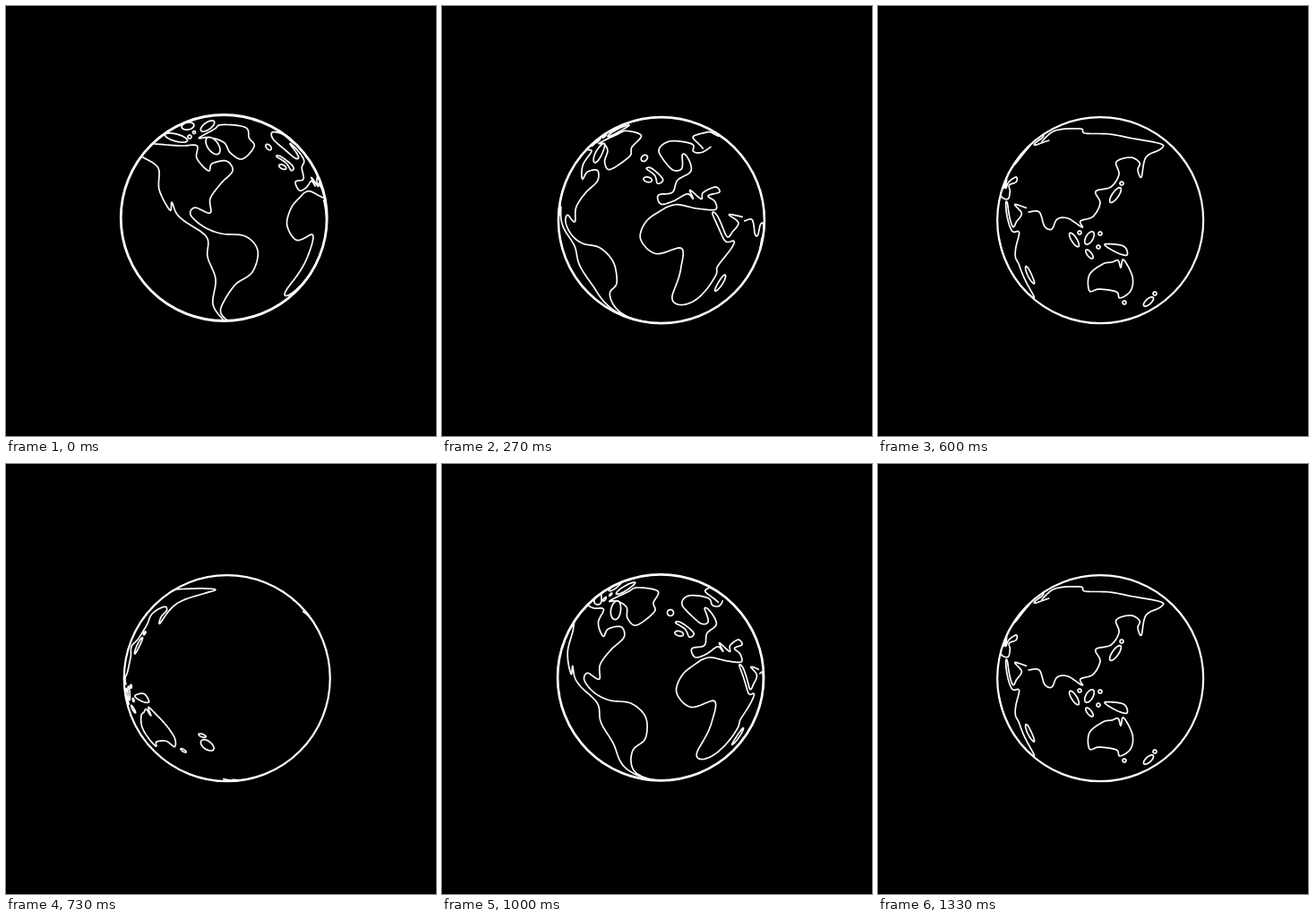
An HTML page with a canvas for the animation above (1470 ms loop, 480 by 480 pixels).

```html
<!DOCTYPE html>
<html lang="en">
<head>
<meta charset="utf-8">
<title>Spinning globe</title>
<style>
html, body { margin: 0; width: 100%; height: 100%; overflow: hidden; background: #000; }
canvas { display: block; }
</style>
</head>
<body>
<canvas id="stage" width="480" height="480"></canvas>
<script>
const ctx = document.getElementById('stage').getContext('2d');
const LOOP = 1470, RADIUS = 115, DEG = Math.PI / 180;

// The globe turns in steps: the times of the steps, and the turn in degrees
// at some of them; the steps between are evenly spread.
const steps = [0, 70, 200, 270, 400, 470, 530, 600, 730, 800, 870, 930, 1000, 1130, 1200, 1270, 1330];
const keys = [[0, 0], [2, 29], [5, 91], [7, 148], [10, 360], [12, 389], [16, 508]];

function turnAt(time) {
  const step = steps.filter(start => start <= time).length - 1;
  const next = Math.max(1, keys.findIndex(key => key[0] >= step));
  const [a, from] = keys[next - 1], [b, to] = keys[next];
  return from + (to - from) * (step - a) / (b - a);
}

// The globe nods and drifts a little as it turns.
function cameraAt(turn) {
  const lon = turn * DEG;
  return {
    lon,
    tilt: (11 * Math.cos(lon - 70 * DEG) - 4) * DEG,
    x: 245.6 - 2.6 * Math.cos(lon + 25 * DEG),
    y: 239.2 - 2.7 * Math.max(0, Math.cos(lon)) ** 8,
    rim: 2.2 + 0.6 * Math.max(0, Math.cos(lon))
  };
}

const rotate = (a, b, angle) => [
  a * Math.cos(angle) - b * Math.sin(angle),
  a * Math.sin(angle) + b * Math.cos(angle)
];

// From the stage onto the sphere, and back.
function lift([px, py], camera) {
  let x = (px - camera.x) / RADIUS, y = (camera.y - py) / RADIUS;
  const size = Math.max(1, Math.hypot(x, y));
  x /= size;
  y /= size;
  let z = Math.sqrt(Math.max(0, 1 - x * x - y * y));
  [y, z] = rotate(y, z, -camera.tilt);
  [x, z] = rotate(x, z, -camera.lon);
  return [x, y, z];
}

function project([x, y, z], camera) {
  [x, z] = rotate(x, z, camera.lon);
  [y, z] = rotate(y, z, camera.tilt);
  return z > -0.02 && [camera.x + RADIUS * x, camera.y - RADIUS * y];
}

// Catmull-Rom curve through "x,y x,y ..."; a leading "z" closes it.
function curve(text) {
  const closed = text[0] === 'z';
  const points = text.replace('z ', '').split(' ').map(p => p.split(',').map(Number));
  const n = points.length, out = [];
  const at = i => closed ? points[(i + n) % n] : points[Math.max(0, Math.min(n - 1, i))];
  for (let i = 0; i < (closed ? n : n - 1); i++) {
    for (let u = 0; u < 1; u += 0.125) {
      out.push([0, 1].map(k => {
        const [a, b, c, d] = [-1, 0, 1, 2].map(j => at(i + j)[k]);
        return b + 0.5 * u * (c - a + u * (2 * a - 5 * b + 4 * c - d + u * (3 * (b - c) + d - a)));
      }));
    }
  }
  return [...out, closed ? out[0] : points[n - 1]];
}

function oval(x, y, rx, ry = rx, angle = 0) {
  return Array.from({ length: 25 }, (_, i) => {
    const t = i * 15 * DEG;
    const [dx, dy] = rotate(rx * Math.cos(t), ry * Math.sin(t), angle * DEG);
    return [x + dx, y + dy];
  });
}

// Land is sketched as seen at the turn where it faces the viewer.
const sketches = [
  { turn: 0, lines: [
    curve('153,169 170,181 171,205 183,228 185,219 190,231 199,240 224,258 225,280 234,305 231,333 243,351'),
    curve('166,154 195,156 213,156 213,170 226,184 230,176 246,173 253,184 240,198 228,215 228,231 211,225 206,233 220,246 240,254 267,257 281,273 275,297 256,311 242,332 240,343 248,352'),
    oval(225, 134, 9, 4, -35),
    oval(231, 156, 6, 11, -35),
    oval(190, 147, 13, 4, 15),
    oval(203, 134, 7, 4, -10),
    oval(205, 146, 2),
    oval(210, 141, 1.5)
  ] },
  { turn: 29, lines: [
    curve('z 187,153 207,143 218,138 241,142 236,155 237,165 217,180 207,172 206,160 196,153'),
    oval(255, 166, 3.5)
  ] },
  { turn: 91, lines: [
    curve('255,160 237,165 228,163 233,155 212,150 194,160 194,180 204,181 213,166 217,168 213,184 195,193 186,206 173,208 173,218 184,216 200,209 205,215 204,205 214,216 218,209 235,204 239,210 223,213 230,220 229,229 207,226 188,220 177,222'),
    curve('177,222 160,235 155,255 168,273 190,269 194,292 199,322 214,333 229,328 238,303 237,292 253,272 254,266 240,264 225,235 230,235 243,260 252,255 261,246 247,236 268,240'),
    curve('z 174,178 178,178 182,191 176,195 177,186'),
    oval(170, 190, 3),
    oval(250, 312, 4, 9, 12)
  ] },
  { turn: 148, lines: [
    curve('183,151 198,139 226,137 231,142 258,143 285,148 316,154 315,160 299,169 294,191 290,183 292,175 282,169 266,174 269,188 260,202 243,207 248,220 240,235 226,240 228,247 212,237 200,238 194,249 186,246 180,230 168,230'),
    curve('z 236,300 251,288 261,286 268,284 271,292 274,283 284,302 282,318 270,326 266,319 247,316 236,318'),
    curve('z 253,266 274,268 278,278 266,275'),
    oval(265, 211, 3.5, 10, 35),
    oval(272, 198, 2),
    oval(219, 261, 3, 9, -32),
    oval(236, 259, 4, 8, 30),
    oval(236, 277, 2.5, 6, -38),
    oval(225, 253, 2),
    oval(248, 254, 2),
    oval(246, 269, 2),
    oval(275, 331, 2),
    oval(302, 330, 7, 3, 138),
    oval(309, 321, 2)
  ] }
];

const land = sketches.flatMap(({ turn, lines }) =>
  lines.map(line => line.map(point => lift(point, cameraAt(turn)))));

function draw(turn) {
  const camera = cameraAt(turn);
  ctx.fillStyle = '#000';
  ctx.fillRect(0, 0, 480, 480);
  ctx.strokeStyle = '#fff';
  ctx.lineJoin = ctx.lineCap = 'round';

  ctx.lineWidth = camera.rim;
  ctx.beginPath();
  ctx.arc(camera.x, camera.y, RADIUS, 0, 2 * Math.PI);
  ctx.stroke();

  ctx.lineWidth = 1.7;
  ctx.beginPath();
  for (const line of land) {
    let down = false;
    for (const point of line) {
      const spot = project(point, camera);
      if (spot) down ? ctx.lineTo(...spot) : ctx.moveTo(...spot);
      down = !!spot;
    }
  }
  ctx.stroke();
}

function tick() {
  draw(turnAt(performance.now() % LOOP));
  requestAnimationFrame(tick);
}
tick();
</script>
</body>
</html>
```
